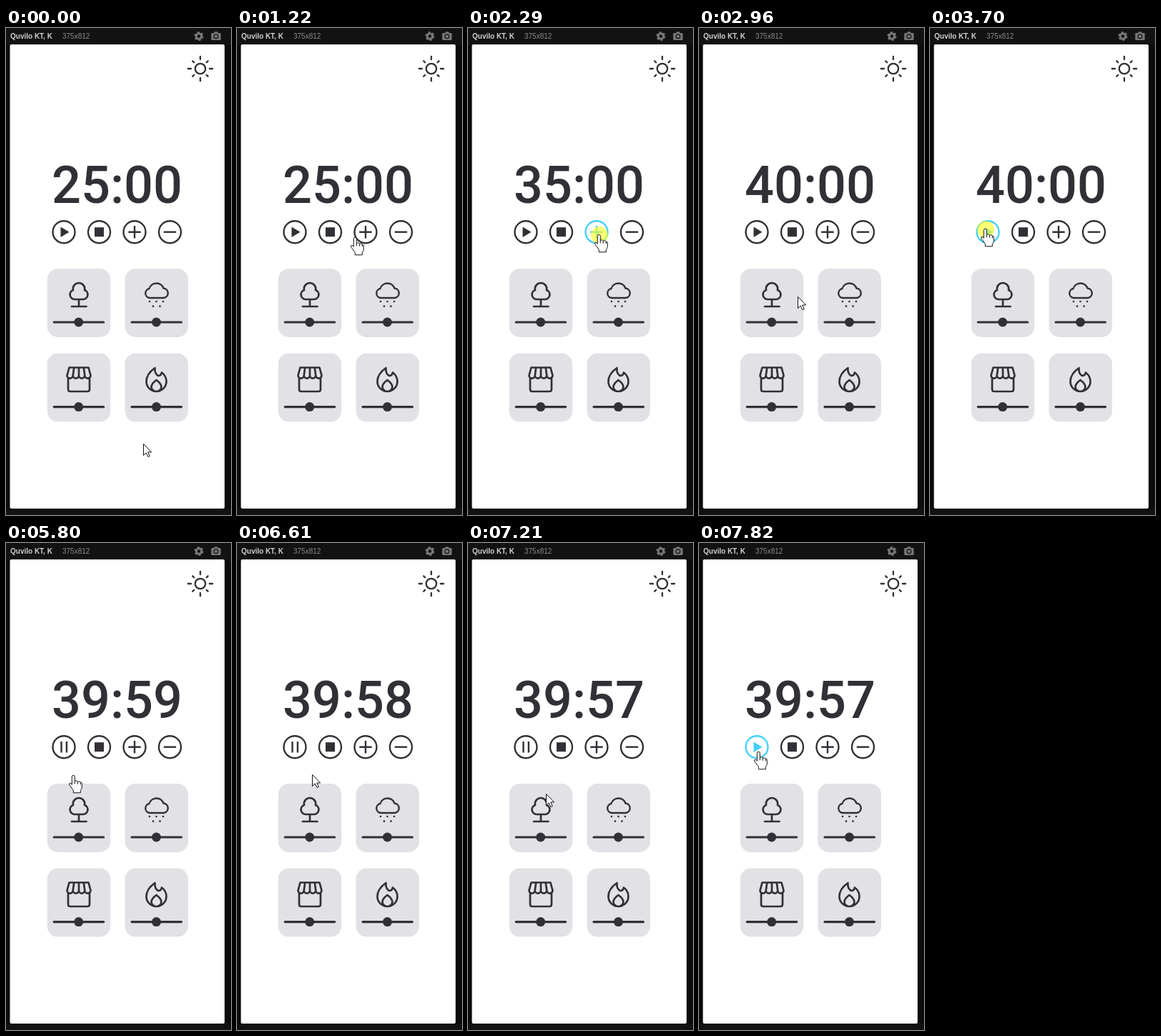
Write an HTML page that moves like this. It is 315 px wide and 682 px high and loops after 8000 ms.

```html
<!DOCTYPE html>
<html lang="en">
<head>
<meta charset="utf-8">
<title>Focus timer</title>
<style>
  html, body { margin: 0; width: 100%; height: 100%; overflow: hidden; background: #121212; }
  svg { display: block; width: 315px; height: 682px; }
  .line { fill: none; stroke: #323036; stroke-width: 2.7; stroke-linecap: round; stroke-linejoin: round; }
  .ink { fill: #323036; }
  .label { font: 10px "Liberation Sans", Arial, sans-serif; }
  .label.name { font-weight: bold; }
  #time { font: 500 72px Roboto, sans-serif; text-anchor: middle; }
  .button { color: #323036; }
  .button.hover { color: #42d0fb; }
  .button * { fill: none; stroke: currentColor; stroke-width: 2.4; }
  .button .solid { fill: currentColor; stroke: none; }
  .pointer { fill: #fff; stroke: #111; stroke-linejoin: round; }
</style>
</head>
<body>
<svg viewBox="0 0 315 682">
  <rect width="315" height="682" fill="#121212"/>
  <rect y="24" width="315" height="649" fill="#0b0b0b"/>
  <rect x="5.5" y="23" width="300.5" height="650" rx="2" fill="#fff"/>

  <text class="label name" x="6" y="15" fill="#d0d0d0">Quvilo KT, K</text>
  <text class="label" x="79" y="15" fill="#8c8c8c">375x812</text>
  <g fill="none" stroke="#777">
    <circle cx="270" cy="11.5" r="3.7" stroke-width="3"/>
    <circle cx="270" cy="11.5" r="5.5" stroke-width="2" stroke-dasharray="3 2.76"/>
  </g>
  <g fill="#777">
    <rect x="287.3" y="7" width="13.4" height="10" rx="1.2"/>
    <rect x="291.5" y="5.3" width="5" height="3" rx="1"/>
    <circle cx="294" cy="11.8" r="2.9" stroke="#121212" stroke-width="1.2"/>
  </g>

  <g class="line" id="sun" transform="translate(272 57)" style="stroke-width:2.3"><circle r="7.2"/></g>
  <text id="time" class="ink" x="155.5" y="245">25:00</text>
  <g id="buttons"></g>
  <g id="cards"></g>

  <g class="line">
    <path d="M96 380A6.7 6.7 0 0 1 94 367A8.2 8.2 0 1 1 110 367A6.7 6.7 0 0 1 108 380zM102 380V390M92 390H112.500"/>
    <path d="M201 378A6.6 6.6 0 0 1 200.500 365A10.500 10.500 0 0 1 220.500 364.500A6.8 6.8 0 0 1 221 378z" stroke-width="2.4"/>
    <path d="M201 383H221M206 389.700H216" stroke-dasharray="0 9.5"/>
    <path id="store" d="M87 491V506q0 3 3 3H114q3 0 3-3V491"/>
    <path d="M208.500 476C200 482 196.500 488 196.500 495A14 14 0 0 0 224.500 495C224.500 490 221.500 485 218 482.500C217.500 485.500 215.500 487 213 487C209.500 485 208 481 208.500 476zM210.500 493C205 497 203.500 500 203.500 502.500A7 6.5 0 0 0 217.500 502.500C217.500 500 216 497 210.500 493z"/>
  </g>

  <g id="cursor">
    <circle id="press" r="12" fill="#ffff1e" fill-opacity=".62"/>
    <path id="arrow" class="pointer" d="M.5.500V16.500L4.200 13L7 18.600L9.300 17.500L6.700 12H11.700z"/>
    <path id="hand" class="pointer" transform="translate(-.7 -.7)" d="M-2 13V2a2 2 0 0 1 4 0V8q3-1.500 4 .8q3-1 4 1q2-.3 2 2V17q0 2-2 4v3.500H0v-3.500L-5.500 13.500q-1-2.500 1-2.500q1.500 0 2.500 2zM2 8V12M6 9V12.500M10 10V13"/>
  </g>
</svg>
<script>
const LOOP = 8000, PRESS = 145, START = 3690, STOP = 7670;
const $ = id => document.getElementById(id);
const range = n => [...Array(n).keys()];
const show = (id, visible) => $(id).style.display = visible ? "" : "none";

function add(parent, tag, attrs) {
  const node = document.createElementNS("http://www.w3.org/2000/svg", tag);
  for (const key in attrs) node.setAttribute(key, attrs[key]);
  return parent.appendChild(node);
}

// Sun rays, the diagonal ones shorter
for (const i of range(8))
  add($("sun"), "path", { d: i % 2 ? "M12.300 0h2.800" : "M13 0h4.200", transform: `rotate(${i * 45})` });

// Shop awning: flaps that widen downwards
let awning = "";
for (const i of range(4)) {
  const top = 88.5 + i * 6.75, bottom = 85.5 + i * 8.25;
  awning += `M${top} 475.500h6.750L${bottom + 8.25} 486.500a4.100 4.100 0 0 1-8.250 0z`;
}
$("store").setAttribute("d", awning + $("store").getAttribute("d"));

for (const x of [57.7, 166.5]) for (const y of [337, 455.6]) {
  add($("cards"), "rect", { x, y, width: 88.5, height: 96, rx: 15, fill: "#e2e1e6" });
  add($("cards"), "path", { class: "line", d: `M${x + 9.5} ${y + 75}h69.500`, style: "stroke-width:3.1" });
  add($("cards"), "circle", { class: "ink", cx: x + 44, cy: y + 75, r: 6.5 });
}

const BUTTON_Y = 285.7, buttonX = i => 81 + 49.5 * i;
const buttons = range(4).map(i => {
  const group = add($("buttons"), "g", { class: "button", transform: `translate(${buttonX(i)} ${BUTTON_Y})` });
  add(group, "circle", { r: 15.5 });
  return group;
});
add(buttons[0], "path", { id: "play", class: "solid", d: "M-4.500-7.200L7.500 0L-4.500 7.200z" });
add(buttons[0], "path", { id: "pause", d: "M-3.500-7.700V7.700M3.900-7.700V7.700" });
add(buttons[1], "path", { class: "solid", d: "M-6.500-6.500h13v13h-13z" });
add(buttons[2], "path", { d: "M-8.700 0H8.700M0-8.700V8.700" });
add(buttons[3], "path", { d: "M-8.700 0H8.700" });

// Cursor trips: leave, arrive, target x, y, sideways bow relative to the distance
const trips = [
  [20, 410, 184, 154, 0],
  [670, 1220, 166, 294, .3],
  [1220, 1480, 184, 290, 0],
  [2580, 3500, 78, 282, -1.8],
  [3850, 4450, 88, 328, 0],
  [5180, 6610, 105, 324, 0],
  [6900, 7210, 109, 351, 0],
  [7310, 7620, 84, 293, 0]
];
const plusPresses = range(3).map(i => 1480 + 400 * i);
const presses = [...plusPresses, START, STOP];

function cursorAt(t) {
  let x = 192, y = 582;
  for (const [leave, arrive, tx, ty, bow] of trips) {
    if (t < leave) break;
    const p = Math.min(1, (t - leave) / (arrive - leave));
    const s = p * p * (3 - 2 * p), side = 2 * s * (1 - s) * bow;
    const dx = tx - x, dy = ty - y;
    x += dx * s - dy * side;
    y += dy * s + dx * side;
  }
  return [Math.round(x), Math.round(y)];
}

function reading(t) {
  const added = plusPresses.filter(p => t >= p + PRESS).length * 5;
  const elapsed = Math.floor(Math.max(0, Math.min(t, STOP + PRESS) - START - PRESS) / 1000);
  const left = (25 + added) * 60 - elapsed;
  return [left / 60, left % 60].map(n => String(Math.floor(n)).padStart(2, "0")).join(":");
}

function draw() {
  const t = performance.now() % LOOP;
  const [x, y] = cursorAt(t);
  const overButton = y > 269 && y < 334 && buttons.some((_, i) => Math.abs(x - buttonX(i)) <= 18);
  const running = t >= START + PRESS && t < STOP + PRESS;

  $("cursor").setAttribute("transform", `translate(${x} ${y})`);
  show("hand", overButton);
  show("arrow", !overButton);
  show("press", presses.some(p => t >= p && t < p + PRESS));
  show("play", !running);
  show("pause", running);
  buttons.forEach((button, i) =>
    button.classList.toggle("hover", Math.hypot(x - buttonX(i), y - BUTTON_Y) < 16));
  $("time").textContent = reading(t);
  requestAnimationFrame(draw);
}
draw();
</script>
</body>
</html>
```
